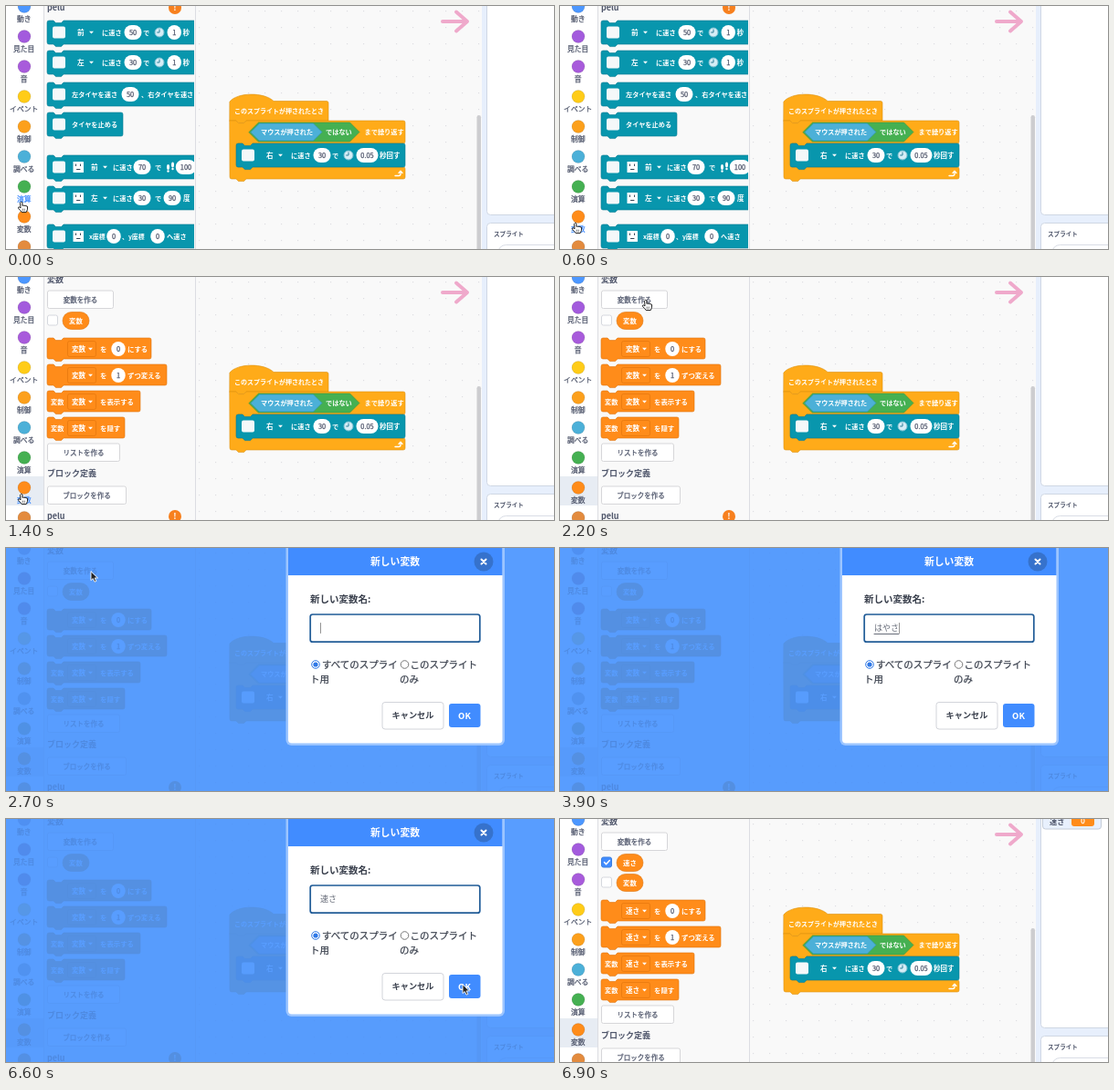
An HTML page for the animation above (8.9 s loop, 600x267 px).

```html
<!DOCTYPE html>
<html lang="ja">
<head>
<meta charset="utf-8">
<title>変数を作る</title>
<style>
html, body { margin: 0; width: 100%; height: 100%; overflow: hidden; background: #fff; }
svg { display: block; width: 600px; height: 267px; }
text { font-family: "Noto Sans CJK JP", "Noto Sans CJK", "Noto Sans", sans-serif; white-space: pre; }
.dimmed { opacity: .19; filter: saturate(.4); }
</style>
</head>
<body>
<svg id="stage" viewBox="0 0 600 267" xmlns="http://www.w3.org/2000/svg"></svg>
<script>
const LOOP = 8900, STEP = 100;
const TEAL = '#0896ad', TEAL_DARK = '#067b92';
const ORANGE = '#ff8c1a', ORANGE_DARK = '#e0720b';
const GOLD = '#ffab19', GOLD_DARK = '#dc9010';
const BLUE = '#418cff', INK = '#4f566b', DARK = '#3a404d';

// [label, colour]
const CATEGORIES = [
  ['動き', '#4c97ff'], ['見た目', '#a35bdd'], ['音', '#a85bdb'], ['イベント', '#ffcc18'],
  ['制御', '#fca01c'], ['調べる', '#4cb0d8'], ['演算', '#45b052'], ['変数', ORANGE], ['', '#e38b3e']
];

// Timelines: [start ms, value...]; each holds until the next row
const SCROLL = [[0, 261], [1100, 31], [1200, 10], [1300, 3], [1400, 0]];
const TYPED = [[0, ''], [3000, 'h'], [3100, 'は'], [3200, 'はy'], [3300, 'はや'],
  [3600, 'はやs'], [3900, 'はやさ'], [4200, '速さ']];
const POINTER = [
  [0, 'hand', 17, 215], [500, 'hand', 17, 227], [600, 'hand', 17, 238],
  [1900, 'arrow', 33, 196], [2000, 'arrow', 60, 122], [2100, 'hand', 84, 52], [2200, 'hand', 94, 25],
  [2700, 'arrow', 93, 26], [3000, 'none', 0, 0],
  [6200, 'arrow', 142, 45], [6300, 'arrow', 256, 88], [6400, 'arrow', 378, 135],
  [6500, 'arrow', 467, 169], [6600, 'arrow', 500, 182], [6900, 'none', 0, 0]
];
const at = (table, t) => table.filter(row => row[0] <= t).pop().slice(1);

// Weight 500 is drawn as regular with a hairline, since no medium face is installed
function text(x, cy, str, size = 7.2, fill = '#fff', weight = 700, anchor = 'start') {
  const face = weight === 500 ? `font-weight="400" stroke="${fill}" stroke-width=".25"` : `font-weight="${weight}"`;
  return `<text x="${x}" y="${cy + size * 0.37}" font-size="${size}" fill="${fill}" ${face} text-anchor="${anchor}">${str}</text>`;
}
const mid = (x, cy, str, size, fill, weight) => text(x, cy, str, size, fill, weight, 'middle');
const rect = (x, y, w, h, r, fill, stroke = 'none', sw = 1) =>
  `<rect x="${x}" y="${y}" width="${w}" height="${h}" rx="${r}" fill="${fill}" stroke="${stroke}" stroke-width="${sw}"/>`;
const circle = (x, y, r, fill, stroke = 'none', sw = 1) =>
  `<circle cx="${x}" cy="${y}" r="${r}" fill="${fill}" stroke="${stroke}" stroke-width="${sw}"/>`;
const path = (d, fill, stroke = 'none', sw = 0.6) =>
  `<path d="${d}" fill="${fill}" stroke="${stroke}" stroke-width="${sw}" stroke-linejoin="round" stroke-linecap="round"/>`;
const move = (x, y, body) => `<g transform="translate(${x} ${y})">${body}</g>`;

const NOTCH = 'h5l2.5 2.6h6l2.5 -2.6';
const BUMP = 'l-2.5 2.6h-6l-2.5 -2.6h-5';
const block = (x, y, w, h, fill, edge) => path(
  `M${x} ${y + 2}q0 -2 2 -2${NOTCH}H${x + w - 2}q2 0 2 2v${h - 4}q0 2 -2 2H${x + 18}${BUMP}q-2 0 -2 -2z`, fill, edge);
const hexagon = (x1, x2, y1, y2, fill, edge) => {
  const k = (y2 - y1) / 2, y = y1 + k;
  return path(`M${x1} ${y}L${x1 + k} ${y1}H${x2 - k}L${x2} ${y}L${x2 - k} ${y2}H${x1 + k}z`, fill, edge);
};
const pillWidth = str => str.length > 3 ? 24 : 12 + 3.5 * str.length;
const pill = (x, cy, str) => {
  const w = pillWidth(str);
  return rect(x - w / 2, cy - 8, w, 16, 8, '#fff') + mid(x, cy, str, 7.4, INK, 500);
};
const caret = (x, cy) => path(`M${x} ${cy - 1.2}h5l-2.5 2.8z`, '#fff');
const menu = (x, cy, str) => text(x, cy, str, 7.6) + caret(x + 13, cy);
const robot = (x, cy) => rect(x, cy - 6.5, 14, 13, 2, '#f4f8f9');
const mat = (x, cy) => rect(x, cy - 6, 11.5, 12, 0.5, '#fff') +
  path(`M${x + 3} ${cy - 3}v1.5M${x + 8} ${cy - 3}v1.5M${x + 4} ${cy + 2.5}h3.5`, 'none', '#345', 1);
const clock = (x, cy) => circle(x, cy, 5, '#d5edf6', '#7bbfd0') + path(`M${x} ${cy - 3}v3h-2.4`, 'none', '#2f7f98', 1);
const feet = (x, cy) => [[-2.5, 1], [2.5, -1.5]].map(([dx, dy]) =>
  `<ellipse cx="${x + dx}" cy="${cy + dy}" rx="1.5" ry="3" fill="#fff"/>` + circle(x + dx, cy + dy + 4.5, 1.2, '#fff')).join('');
const button = (y, w, str) => rect(45.5, y - 10, w, 19.5, 2, '#fff', '#d6d6d9') + mid(45.5 + w / 2, y, str, 7.5, INK, 500);
const heading = (y, str) => text(45, y, str, 9, INK);

const robotBlock = (x, y, w, body) => block(x, y - 13, w, 26, TEAL, TEAL_DARK) + robot(x + 6, y) + body;
const turnBlock = (x, y, w, dir, speed, secs, unit) => robotBlock(x, y, w,
  menu(x + 33, y, dir) + text(x + 60, y, 'に速さ') + pill(x + 94, y, speed) + text(x + 105, y, 'で') +
  clock(x + 123, y) + pill(x + 131.5 + pillWidth(secs) / 2, y, secs) +
  text(x + 133 + pillWidth(secs), y, unit, 7.5));

function categories(t, hover) {
  let out = rect(0, 0, 41, 267, 0, '#fff');
  if (t >= 1200) out += rect(0, 219, 41, 32, 0, '#e7ecf3');
  CATEGORIES.forEach(([name, fill], i) => {
    const y = 0.5 + i * 33;
    out += circle(20, y, 7, fill, 'rgba(0,0,0,.12)', 0.8) +
      mid(19.7, y + 14, name, 7.8, name === hover ? BLUE : INK, 500);
  });
  return out;
}

function robotBlocks() {
  const row = (y, w, body) => robotBlock(45, y, w, body);
  const go = (y, dir, speed, rest) => row(y, 200, mat(73.5, y) + menu(93, y, dir) +
    text(117, y, 'に速さ') + pill(149, y, speed) + text(163, y, 'で') + rest);
  return turnBlock(45, 27, 200, '前', '50', '1', '秒') + turnBlock(45, 60, 200, '左', '30', '1', '秒') +
    row(95, 200, text(72, 95, '左タイヤを速さ') + pill(136, 95, '50') + text(148, 95, '、右タイヤを速さ')) +
    row(128, 83, text(72, 128, 'タイヤを止める')) +
    go(175, '前', '70', feet(180, 174) + pill(197, 175, '100')) +
    go(209, '左', '30', pill(182, 209, '90') + text(194, 209, '度', 7.6)) +
    row(251, 200, mat(73.5, 251) + text(91, 251, 'x座標', 6.9) + pill(118, 251, '0') +
      text(127, 251, '、y座標', 6.9) + pill(166, 251, '0') + text(176, 251, 'へ速さ'));
}

function palette(t) {
  const added = t >= 6900, name = added ? '速さ' : '変数', shift = added ? 22 : 0;
  const variable = (y, label, on) =>
    rect(45.5, y - 6, 11, 11, 2, on ? BLUE : '#fff', on ? '#3c80e0' : '#d5d8de') +
    (on ? path(`M48.5 ${y - 0.5}l2 2.2l3.8 -4.2`, 'none', '#fff', 1.5) : '') +
    rect(62, y - 9.5, 29, 19, 9.5, ORANGE, ORANGE_DARK, 0.6) + mid(76.5, y, label, 7.4);
  const row = (y, w, pre, body) => block(45, y - 12, w, 23, ORANGE, ORANGE_DARK) +
    (pre ? text(49, y, pre) : '') + rect(67.5, y - 8.5, 31, 17, 2, ORANGE, ORANGE_DARK, 0.6) +
    text(72, y, name, 7.6) + caret(90, y) + body;
  const assign = (y, w, value, rest) =>
    row(y, w, '', text(103, y, 'を', 7.4) + pill(123, y, value) + text(133, y, rest, 7.4));
  let rows = '';
  if (added) rows += variable(48, '速さ', true);
  rows += variable(48 + shift, '変数', false);
  const lower = assign(79, 114, '0', 'にする') + assign(108, 131, '1', 'ずつ変える') +
    row(137, 102, '変数', text(103, 137, 'を表示する', 7.4)) +
    row(166, 85, '変数', text(103, 166, 'を隠す', 7.4)) +
    button(193, 79, 'リストを作る') + heading(216, 'ブロック定義') + button(240, 86, 'ブロックを作る') +
    move(0, 263, heading(0, 'pelu') + circle(185, 0, 7, '#f7801e') + mid(185, 0, '!', 9) + robotBlocks());
  const body = heading(2.5, '変数') + button(25, 72, '変数を作る') + rows + move(0, shift, lower);
  return rect(41, 0, 167, 267, 0, '#f9f9f9') +
    `<g clip-path="url(#flyout)">${move(0, -at(SCROLL, t)[0], body)}</g>` +
    path('M41.5 0V267M207.5 0V267', 'none', '#dcdde2', 1);
}

function workspace() {
  const hat = path(`M245 105c8 -10.5 38 -10.5 48 -0.5H351q2 0 2 2V126H263${BUMP}h-2z`, GOLD, GOLD_DARK);
  const loop = path(`M245 126h2${NOTCH}H435q2 0 2 2V149q0 2 -2 2H270${BUMP}V177${NOTCH}H435q2 0 2 2V188q0 2 -2 2H263${BUMP}q-2 0 -2 -2z`, GOLD, GOLD_DARK);
  return rect(208, 0, 313, 267, 0, '#f9f9f9') + rect(208, 0, 313, 267, 0, 'url(#dots)') +
    path('M478 17H504M493 6.5L505 17L493 27.5', 'none', '#efa9cb', 4) +
    hat + text(250, 115, 'このスプライトが押されたとき', 7) + loop +
    hexagon(266, 387, 128, 149, '#45b052', '#389438') +
    hexagon(268, 346, 129, 148, '#4cb0d8', '#2e8eb8') +
    text(279, 138.5, 'マウスが押された', 7.15) + text(350, 138.5, 'ではない') +
    text(392.5, 138.5, 'まで繰り返す') +
    turnBlock(252, 164, 185, '右', '30', '0.05', '秒回す') +
    path('M426 186.5h4q2 0 2 -2v-2.5M430 183.5l2 -2.2l2 2.2', 'none', '#fff', 1.3) +
    rect(515.5, 120, 4.5, 160, 2.2, '#cdcdd0');
}

function sidePanel(t) {
  const monitor = rect(528.5, -8, 64, 19, 3, '#e8f0fd', '#c4ccd8') + text(536, 2.5, '速さ', 8.2, INK) +
    rect(560, -6, 25, 14, 3, ORANGE) + mid(572.5, 2.5, '0', 8, '#fff', 500);
  return rect(521, 0, 79, 267, 0, '#e7effc') +
    rect(526.5, -8, 90, 237.5, 4, '#fff', '#cfd7e4') + (t >= 6900 ? monitor : '') +
    rect(526.5, 238.5, 90, 50, 4, '#fff', '#cfd7e4') + text(534, 251, 'スプライト', 6.6, INK) +
    rect(538.5, 262.5, 80, 20, 9, '#fff', '#d9dde5');
}

function modal(t) {
  const [typed] = at(TYPED, t);
  const width = [...typed].reduce((w, c) => w + (c < '\x7f' ? 5 : 9), 0);
  const composing = typed && t < 4900;
  const radio = (x, on) => circle(x, 128, 4.3, '#fff', on ? '#2f78e6' : '#777', 1) + (on ? circle(x, 128, 2.6, '#2f78e6') : '');
  const label = (x, y, str) => text(x, y, str, 10.5, DARK, 500);
  return rect(306.5, -12, 239.5, 229, 6, '#9cc5ff') + rect(309, -10, 234.5, 224.5, 4, '#fff') +
    rect(309, -10, 234.5, 40, 0, BLUE) + mid(426, 15, '新しい変数', 10.8) +
    circle(523, 15, 10.5, '#3672cc') + path('M520.5 12.5l5 5M525.5 12.5l-5 5', 'none', '#fff', 2) +
    text(333, 56, '新しい変数名:', 10.5, DARK) +
    rect(332, 72, 188, 32.5, 4, '#e4efff') + rect(333.2, 73, 185.6, 30.2, 2.5, '#fff', '#235d97', 1.7) +
    text(344, 88, typed, 9, '#676c79', 400) +
    (composing ? path(`M344 94.5h${width}`, 'none', '#676c79', 1) : '') +
    (t < 4900 ? path(`M${344.5 + width} 82.5v11`, 'none', '#888', 0.9) : '') +
    radio(339, true) + label(346, 128, 'すべてのスプライ') + label(333, 144, 'ト用') +
    radio(436.5, false) + label(442.5, 128, 'このスプライト') + label(431, 144, 'のみ') +
    rect(412, 169.5, 67, 29.5, 3, '#fff', '#d2d4da') + mid(445.5, 184, 'キャンセル', 9.2, DARK) +
    rect(485, 171, 34.5, 26, 3, BLUE) + mid(502, 184, 'OK', 9.5);
}

function pointer(t) {
  const [shape, x, y] = at(POINTER, t);
  if (shape === 'none') return '';
  return move(x, y, shape === 'arrow'
    ? path('M0 0V9.6L2.3 7.5L4 11.2L5.8 10.4L4.2 6.9H7.1z', '#222', '#fff', 0.9)
    : path('M-1.3 1q1.1 -1.8 2.2 0V4.3q1.3 -.8 2 .2q1.3 -.7 2 .3q1.6 -.4 1.7 1.2q.2 3 -1.4 5.6H.2Q-1 9.5 -3.5 7.4q-.5 -1.7 1 -1.5l1.2 .8z', '#fff', '#222', 1) +
      path('M1.2 8v2M3.2 8v2', 'none', '#222', 0.6));
}

const DEFS = `<defs>
  <clipPath id="flyout"><rect x="41" y="-300" width="165" height="900"/></clipPath>
  <pattern id="dots" x="211" y="5" width="18" height="18" patternUnits="userSpaceOnUse"><rect width="1.2" height="1.2" fill="#dedee2"/></pattern>
</defs>`;

function picture(t) {
  const open = t >= 2700 && t < 6900;
  const hover = t < 500 ? '演算' : t >= 600 && t < 1900 ? '変数' : '';
  const scene = workspace() + palette(t) + categories(t, hover) + sidePanel(t);
  return DEFS + rect(0, 0, 600, 267, 0, '#fff') + `<g class="${open ? 'dimmed' : ''}">${scene}</g>` +
    (open ? `<rect width="600" height="267" fill="#589dff" style="mix-blend-mode:multiply"/>` + modal(t) : '') +
    pointer(t);
}

const stage = document.getElementById('stage');
const start = performance.now();
let shown = -1;
function tick() {
  const t = Math.floor(((performance.now() - start) % LOOP) / STEP) * STEP;
  if (t !== shown) {
    shown = t;
    stage.innerHTML = picture(t);
  }
  requestAnimationFrame(tick);
}
tick();
</script>
</body>
</html>
```
